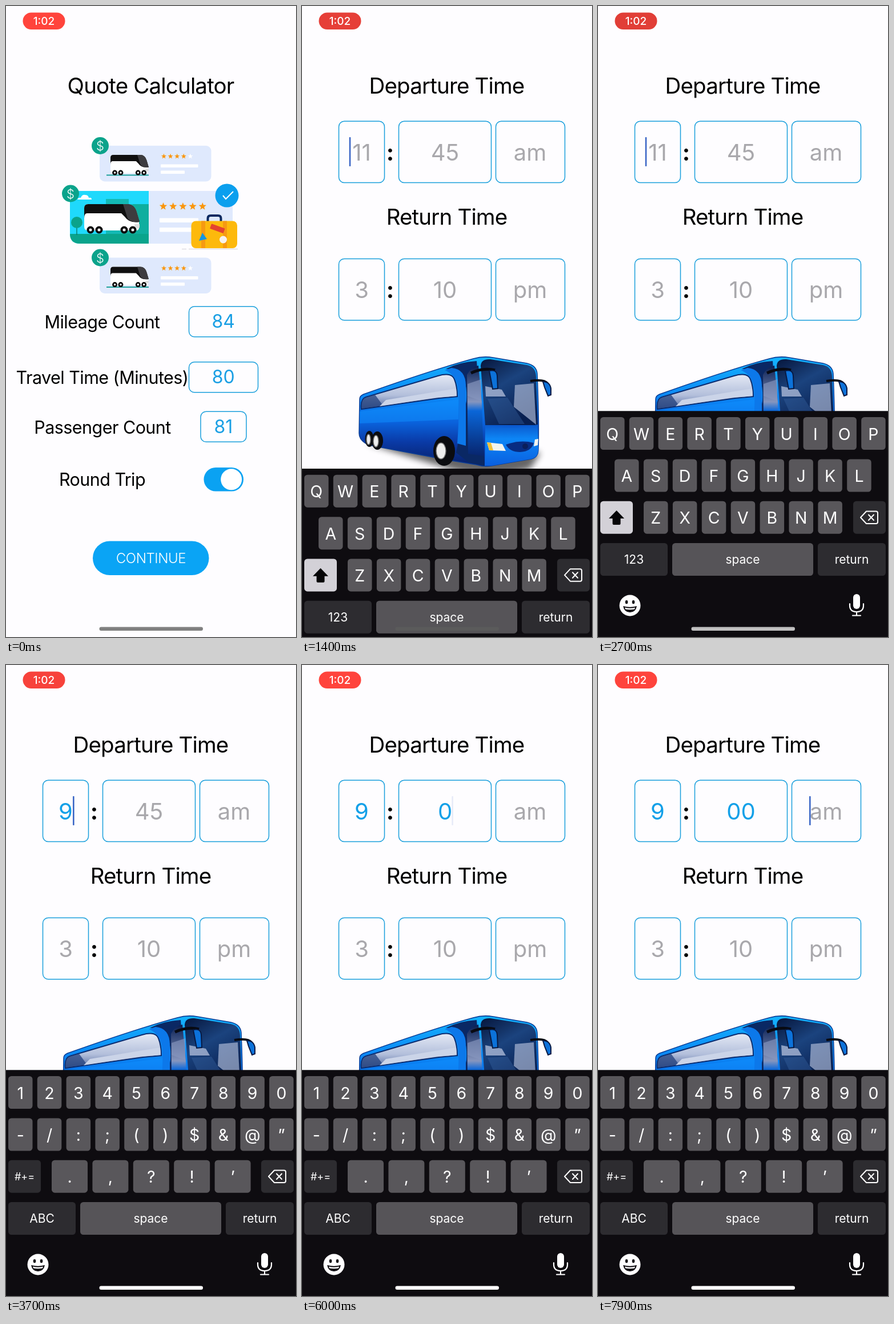
Animation, 508 px wide and 1102 px high, one loop 8000 ms. Source, as an HTML page:

```html
<!DOCTYPE html>
<html lang="en">
<head>
<meta charset="utf-8">
<title>Quote Calculator</title>
<style>
html, body { margin: 0; width: 100%; height: 100%; overflow: hidden; background: #fefdff; }
svg { display: block; width: 100%; height: 100%; }
text { font-family: Inter, Roboto, sans-serif; font-optical-sizing: none; text-anchor: middle; white-space: pre; }
.title { font-size: 38.5px; letter-spacing: -.022em; }
.label { font-size: 30.5px; letter-spacing: -.018em; }
.num { font-size: 32px; fill: #1a9fe4; }
.time { font-size: 40px; fill: #a9a8ac; }
.colon { font-size: 40px; font-weight: 700; }
.btn { font-size: 24px; font-weight: 300; fill: #fff; letter-spacing: -.016em; }
.box { fill: none; stroke: #1a9fdc; stroke-width: 1.5; }
.key { font-size: 28.5px; fill: #fff; }
.word { font-size: 21px; fill: #fff; }
.pop { font-size: 42px; fill: #fff; }
</style>
</head>
<body>
<svg viewBox="0 0 508 1102" preserveAspectRatio="none">
<defs>
  <linearGradient id="side" x1="0" y1="0" x2="0" y2="1">
    <stop offset="0" stop-color="#14b4ff"/><stop offset=".42" stop-color="#0a80f2"/>
    <stop offset=".6" stop-color="#0a62dc"/><stop offset=".78" stop-color="#0a3aa6"/><stop offset="1" stop-color="#071f66"/>
  </linearGradient>
  <linearGradient id="nose" x1="0" y1="0" x2="0" y2="1">
    <stop offset="0" stop-color="#0b58cc"/><stop offset=".35" stop-color="#0d86f6"/><stop offset="1" stop-color="#0a5fe0"/>
  </linearGradient>
  <linearGradient id="glass" x1="0" y1="0" x2="0" y2="1">
    <stop offset="0" stop-color="#e4e9f5"/><stop offset=".6" stop-color="#b3bfdb"/><stop offset="1" stop-color="#52689e"/>
  </linearGradient>
  <linearGradient id="shield" x1="0" y1="0" x2=".5" y2="1">
    <stop offset="0" stop-color="#06163c"/><stop offset=".45" stop-color="#1b437e"/><stop offset="1" stop-color="#081f50"/>
  </linearGradient>
  <linearGradient id="door" x1="0" y1="0" x2="0" y2="1">
    <stop offset="0" stop-color="#081e52"/><stop offset=".4" stop-color="#8796be"/>
    <stop offset=".5" stop-color="#0a66d8"/><stop offset="1" stop-color="#08256e"/>
  </linearGradient>
  <filter id="soft" x="-20%" y="-50%" width="140%" height="200%"><feGaussianBlur stdDeviation="6"/></filter>

  <g id="coach">
    <path d="M137 385V353q0-7 7-7h68q13 0 17 14l4 14v13q0 5-5 5H143q-6 0-6-7z" fill="#fff"/>
    <path d="M137 371V353q0-7 7-7h68q13 0 17 14l5 17q-18 3-26-9l-6-6h-60q-5 0-5 9z" fill="#101010"/>
    <path d="M205 346h8q12 0 16 14l5 17q-14 2-21-6z" fill="#3d3c3f"/>
    <path d="M225 381h9v6q-4 2-9 0z" fill="#ddd"/>
    <g fill="#fff" stroke="#0b0b0b" stroke-width="4">
      <circle cx="148" cy="391" r="4.5"/><circle cx="163" cy="391" r="4.5"/>
      <circle cx="207" cy="391" r="4.5"/><circle cx="222" cy="391" r="4.5"/>
    </g>
  </g>

  <g id="bus">
    <path d="M112 764L250 806Q330 830 400 808L418 780 300 770z" fill="#000" opacity=".6" filter="url(#soft)"/>
    <path d="M101 686Q101 681 108 678C170 656 245 631 300 616Q317 611 335 614L394 624Q411 628 412 642C414 690 415 740 414 774Q414 788 402 791L332 803Q318 805 305 801L262 794 118 767Q100 760 100 746z" fill="url(#side)" stroke="#0b3d96" stroke-width="1.5"/>
    <path d="M104 704Q102 686 112 683L238 646Q262 639 267 652 272 664 272 682L240 685z" fill="url(#glass)" stroke="#0a2c70" stroke-width="2"/>
    <path d="M104 703Q103 687 112 684L128 679 142 698z" fill="#23407c" opacity=".75"/>
    <path d="M136 699L147 688 270 668 271 681 235 684z" fill="#cbd4e8"/>
    <path d="M101 708L274 687V722L101 729z" fill="#1090ff" opacity=".5"/>
    <path d="M252 634Q274 622 306 620L320 803 292 797 270 780Q282 720 288 690 290 652 276 640 268 633 252 634z" fill="#0a2864"/>
    <path d="M262 632Q287 634 287 664V768L272 764Q276 710 274 676 273 645 250 636z" fill="#0c78ea"/>
    <path d="M289 644Q296 630 309 628L315 692 318 786 291 782z" fill="url(#door)"/>
    <path d="M290 660L314 652V690L290 681z" fill="#8796be" opacity=".65"/>
    <path d="M313 628Q314 616 330 617L394 627Q409 630 410 646L413 732H321z" fill="url(#shield)"/>
    <path d="M373 662L406 659 410 731 371 700z" fill="#b4c0dc" opacity=".65"/>
    <path d="M321 664L350 670 357 682H322z" fill="#b4c0dc" opacity=".75"/>
    <path d="M325 686L360 684 390 730H345z" fill="#3e6aa8" opacity=".35"/>
    <path d="M321 732Q368 740 413 731L414 774Q414 788 402 791L332 803 320 803z" fill="url(#nose)"/>
    <path d="M357 766Q382 757 406 763 402 778 382 779 364 779 357 766z" fill="#082c82"/>
    <circle cx="391" cy="769" r="5" fill="#0a1f5c"/>
    <path d="M324 762L351 765 357 777 328 776z" fill="#f4f4ee"/>
    <path d="M324 762L331 763 335 776H328z" fill="#f2c23a"/>
    <path d="M408 757L414 756 413 767 406 769z" fill="#f4f4ee"/>
    <path d="M296 641Q318 631 338 636" fill="none" stroke="#080a12" stroke-width="5"/>
    <path d="M328 637Q341 634 342 646L343 668 334 669z" fill="#0c72da" stroke="#071a44" stroke-width="2"/>
    <path d="M400 655Q424 651 430 659" fill="none" stroke="#080a12" stroke-width="4"/>
    <path d="M422 656Q434 656 436 668V679L431 681 425 666z" fill="#0c72da" stroke="#071a44" stroke-width="2"/>
    <g fill="#0b0c10">
      <ellipse cx="118" cy="756" rx="7.5" ry="14"/><ellipse cx="132" cy="759" rx="10" ry="16"/><ellipse cx="249" cy="777" rx="19" ry="26"/>
    </g>
    <g fill="#eee" stroke="#777" stroke-width="1.5">
      <ellipse cx="116.500" cy="757" rx="3.500" ry="9"/><ellipse cx="129.500" cy="760" rx="4.500" ry="10"/><ellipse cx="243.500" cy="777" rx="8.500" ry="14"/>
    </g>
  </g>
</defs>

<rect width="508" height="1102" fill="#fefdff"/>
<g id="quote"></g>
<g id="times"></g>
<g id="keyboard"></g>
<rect id="pill" x="29.500" y="11.500" width="74" height="29.500" rx="14.700"/>
<text x="66.500" y="33" font-size="19" font-weight="500" fill="#fff">1:02</text>
<rect id="homebar" x="163.500" y="1084.500" width="181.500" height="6.500" rx="3.250"/>
</svg>
<script>
const $ = id => document.getElementById(id);
const text = (cls, x, y, s, more = '') => `<text class="${cls}" x="${x}" y="${y}" ${more}>${s}</text>`;
const rect = (x, y, w, h, r, more) => `<rect x="${x}" y="${y}" width="${w}" height="${h}" rx="${r}" ${more}/>`;
const fill = c => `fill="${c}"`;
const frame = (x, y, w, h) => rect(x, y, w, h, 9.5, 'class="box"');
const button = s => rect(152, 934.5, 203.5, 59.5, 29.75, fill('#0aa4f5')) + text('btn', 254, 973, s);

function star(cx, cy, r, color) {
  let p = '';
  for (let i = 0; i < 10; i++) {
    const a = i * Math.PI / 5, q = i % 2 ? r * .42 : r;
    p += `${(cx + q * Math.sin(a)).toFixed(1)},${(cy - q * Math.cos(a)).toFixed(1)} `;
  }
  return `<polygon points="${p}" fill="${color}"/>`;
}
function stars(x, y, step, r, full) {
  let s = '';
  for (let i = 0; i < 5; i++) s += star(x + i * step, y, r, i < full ? '#fa960c' : '#fff');
  return s;
}
const dollar = (x, y) => `<circle cx="${x}" cy="${y}" r="15" fill="#0ba38b"/>` +
  text('', x, y + 8, '$', 'font-size="22" font-weight="300" fill="#fff"');

const smallCard = dy => `<g transform="translate(0 ${dy})">` +
  rect(164, 244, 195.5, 62.5, 9, fill('#dfe9fd')) +
  rect(176, 294.5, 74, 1.8, 0, fill('#0b9a92')) +
  '<use href="#coach" transform="translate(183 260) scale(.69) translate(-137 -346)"/>' +
  stars(276.5, 262.5, 11.6, 4.8, 4) +
  rect(271, 276.5, 65.5, 5.5, 1, fill('#fff')) + rect(271, 287.5, 42, 5.5, 1, fill('#fff')) +
  dollar(165, 244) + '</g>';

const bigCard =
  rect(230, 323, 167, 92, 4, fill('#dfe9fd')) +
  '<path d="M112 323H250V415H130Q112 415 112 397z" fill="#1fd9fc"/>' +
  '<path d="M175 415V337H215V346H243V415z" fill="#13b9b4"/><path d="M203 415V362H222V346H250V415z" fill="#0fae9f"/>' +
  '<path d="M112 398H250V415H130Q112 415 112 398z" fill="#0aa48c"/>' +
  '<path d="M124 375V400" stroke="#087f70" stroke-width="1.5"/><circle cx="124" cy="378" r="10" fill="#0ba38b"/>' +
  '<path d="M125 338q2-4 6-3 2-6 8-5 5 0 6 5 5-1 5 3z" fill="#fff"/>' +
  '<use href="#coach"/>' + stars(275.5, 350, 17.2, 7, 5) +
  rect(269, 370.5, 68, 7.5, 1, fill('#fff')) + rect(269, 387, 68, 7.5, 1, fill('#fff')) +
  dollar(113, 327.5) +
  '<circle cx="387" cy="331" r="20.500" fill="#0b9fee"/><path d="M380 331l5 6 13-13" fill="none" stroke="#fff" stroke-width="2"/>';

const suitcase =
  '<path d="M308 424.500H316M320 424.500H406" stroke="#dedde2" stroke-width="1.5"/>' +
  '<path d="M353.500 378v-7q0-5 5-5h13q5 0 5 5v7" fill="none" stroke="#0c2960" stroke-width="4"/>' +
  rect(324.5, 375.5, 80.5, 47.5, 8, fill('#fdb90c')) +
  rect(342, 375.5, 7, 47.5, 0, fill('#f69a12')) + rect(380, 375.5, 7, 47.5, 0, fill('#f69a12')) +
  rect(358, 384, 25, 9, 1, 'fill="#e4432f" transform="rotate(20 370 388)"') +
  '<path d="M344 396L352 407 338 410z" fill="#1496e0"/><circle cx="380.500" cy="408" r="6.500" fill="#f6f2ee"/>';

$('quote').innerHTML = text('title', 253.5, 152.5, 'Quote Calculator') +
  smallCard(0) + smallCard(195.5) + bigCard + suitcase +
  [['Mileage Count', 168.5, 563, 84, 320.5, 121], ['Travel Time (Minutes)', 168.5, 660, 80, 320.5, 121],
   ['Passenger Count', 169, 746.5, 81, 341, 80]].map(([s, x, y, n, bx, w]) =>
    text('label', x, y, s) + frame(bx, y - 38.3, w, 53) + text('num', 380.8, y - 1, n)).join('') +
  text('label', 168.5, 838, 'Round Trip') +
  rect(346.5, 806, 69.5, 41.5, 20.75, fill('#0aa2f2')) + '<circle cx="394.700" cy="826.800" r="18.500" fill="#fff"/>' +
  button('CONTINUE');

function timeRow(y, values, ids) {
  const cells = [[64.5, 80], [169.5, 162], [339.5, 121]];
  return cells.map(([x, w], i) => frame(x, y, w, 107.3) +
    text('time', x + w / 2 - (i == 2 ? .5 : 0), y + 69, values[i], ids ? `id="${ids[i]}"` : '')).join('') +
    text('colon', 154.5, y + 69, ':');
}
$('times').innerHTML = rect(0, 0, 508, 1102, 0, fill('#fefdff')) +
  text('title', 253.5, 152.5, 'Departure Time') + timeRow(201.2, ['11', '45', 'am'], ['hour', 'minute', 'half']) +
  text('title', 253.5, 382, 'Return Time') + timeRow(441.4, ['3', '10', 'pm']) +
  '<use href="#bus"/>' + button('GET QUOTE') +
  rect(0, 229, 2.6, 51, 1, 'id="caret" fill="#3c67c6"');

const LIGHT = '#59575b', DARK = '#2d2c30';
const key = (x, y, w, s, cls = 'key', color = LIGHT) => rect(x, y, w, 57, 5.5, fill(color)) +
  text(cls, x + w / 2, y + (cls == 'key' ? 39.5 : 36), s);
const keyRow = (chars, x, y, step, w) => [...chars].map((c, i) => key(x + i * step, y, w, c)).join('');
const Y = [718, 791.5, 864.7, 938];

const letters = keyRow('QWERTYUIOP', 4, Y[0], 50.8, 42.5) + keyRow('ASDFGHJKL', 29, Y[1], 50.9, 42.5) +
  keyRow('ZXCVBNM', 80, Y[2], 50.9, 42.5) + key(4, Y[2], 57, '', 'key', '#d3d1d7') +
  '<path d="M32.500 881L46 895H39.500V904Q39.500 906 37.500 906H27.500Q25.500 906 25.500 904V895H19z" fill="#060507"/>' +
  key(4, Y[3], 118, '123', 'word', DARK);
const digits = keyRow('1234567890', 4, Y[0], 50.8, 42.5) + keyRow('-/:;()$', 4, Y[1], 50.8, 42.5) +
  key(359.6, Y[1], 42.5, '&amp;') + keyRow('@”', 410.4, Y[1], 50.8, 42.5) + keyRow('.,?!’', 80, Y[2], 71.4, 63) +
  rect(4, Y[2], 57, 57, 5.5, fill(DARK)) + text('word', 32.5, Y[2] + 35, '#+=', 'style="font-size:18px"') +
  key(4, Y[3], 118, 'ABC', 'word', DARK);

// Enlarged bubble over a pressed top-row key
const bubble = (id, x, l, r, s) => `<g id="${id}"><path d="M${l + 8} 642H${r - 8}Q${r} 642 ${r} 650V690C${r} 708 ${x + 42.5} 706 ${x + 42.5} 722V769q0 6-6 6H${x + 6}q-6 0-6-6V722C${x} 706 ${l} 708 ${l} 690V650Q${l} 642 ${l + 8} 642z" fill="#69676b"/>${text('pop', (l + r) / 2, 694, s)}</g>`;

$('keyboard').innerHTML = rect(0, 707.3, 508, 400, 0, fill('#0e0c10')) +
  `<g id="letters">${letters}</g><g id="digits">${digits}</g>` +
  key(447, Y[2], 57, '', 'key', DARK) +
  '<path d="M470 882.500H487Q490 882.500 490 885.500V901Q490 904 487 904H470L460 893.200z M474 888.500l9 9.500M483 888.500l-9 9.500" fill="none" stroke="#fff" stroke-width="2" stroke-linejoin="round" stroke-linecap="round"/>' +
  key(130, Y[3], 247, 'space', 'word', '#565458') + key(385, Y[3], 119, 'return', 'word', DARK) +
  '<circle cx="56" cy="1047" r="18.500" fill="#fff"/><g fill="#0e0c10"><ellipse cx="50" cy="1041" rx="2.300" ry="3.300"/><ellipse cx="62" cy="1041" rx="2.300" ry="3.300"/>' +
  '<path d="M44 1048Q56 1051.500 68 1048 66 1059 56 1059 46 1059 44 1048z"/></g><path d="M47 1050.500Q56 1053 65 1050.500L64 1053.500Q56 1055 48 1053.500z" fill="#fff"/>' +
  rect(447, 1027, 12, 26, 6, fill('#fff')) +
  '<path d="M441 1044v3q0 11 12 11t12-11v-3M453 1058v6.500M446 1064.500h14" fill="none" stroke="#fff" stroke-width="2.200" stroke-linecap="round"/>' +
  bubble('pop9', 410.4, 394, 469, 9) + bubble('pop0', 461.2, 437, 508, 0);

const LOOP = 8000, RISE = 1255;
const CARETS = [[RISE, 82.7], [3650, 117], [4250, 223.2], [5400, 262.3], [6500, 275.5], [6900, 370]];
const BAR = [[0, 128], [900, 62], [1250, 62], [1600, 130], [2700, 192], [3500, 255], [LOOP, 255]];
const clamp = v => Math.max(0, Math.min(1, v));
const within = (t, ...spans) => spans.some(([a, b]) => t >= a && t < b);
const show = (id, on) => $(id).setAttribute('visibility', on ? 'visible' : 'hidden');

function track(points, t) {
  const i = points.findIndex(p => p[0] > t), [a, u] = points[i - 1], [b, v] = points[i];
  return u + (v - u) * (t - a) / (b - a);
}
function setField(id, value, typed) {
  $(id).textContent = value;
  $(id).style.fill = typed ? '#12a0e8' : '';
}
function blink(p) {
  return p < 460 ? 1 : p < 850 ? 1 - clamp((p - 460) / 160) : (p - 850) / 150;
}

function draw(t) {
  const slide = Math.pow(1 - clamp((t - 400) / 450), 3);
  $('times').setAttribute('transform', `translate(${508 * slide} 0)`);
  show('times', slide < 1);

  // Critically damped rise
  const s = Math.max(0, t - RISE) * .01826;
  $('keyboard').setAttribute('transform', `translate(0 ${(395 * (1 + s) * Math.exp(-s)).toFixed(2)})`);
  $('keyboard').style.display = t < RISE ? 'none' : '';

  const numeric = within(t, [3000, 4250], [5000, 6900], [7450, LOOP]);
  show('digits', numeric);
  show('letters', !numeric);
  show('pop9', within(t, [3480, 3700]));
  show('pop0', within(t, [5300, 5520], [6400, 6600]));

  setField('hour', t < 3650 ? '11' : '9', t >= 3650);
  setField('minute', t < 5400 ? '45' : t < 6500 ? '0' : '00', t >= 5400);

  const caret = CARETS.filter(c => c[0] <= t).pop();
  $('caret').setAttribute('opacity', caret ? blink((t - caret[0]) % 1000) : 0);
  if (caret) $('caret').setAttribute('x', caret[1]);

  const glow = .5 + .5 * Math.cos(t * Math.PI / 1000);
  $('pill').setAttribute('fill', `rgb(${217 + 38 * glow},${60 + 8 * glow},${54 + 6 * glow})`);
  const g = Math.round(track(BAR, t));
  $('homebar').setAttribute('fill', `rgb(${g},${g},${g})`);
}

const start = performance.now();
function tick() {
  draw((performance.now() - start) % LOOP);
  requestAnimationFrame(tick);
}
tick();
</script>
</body>
</html>
```
